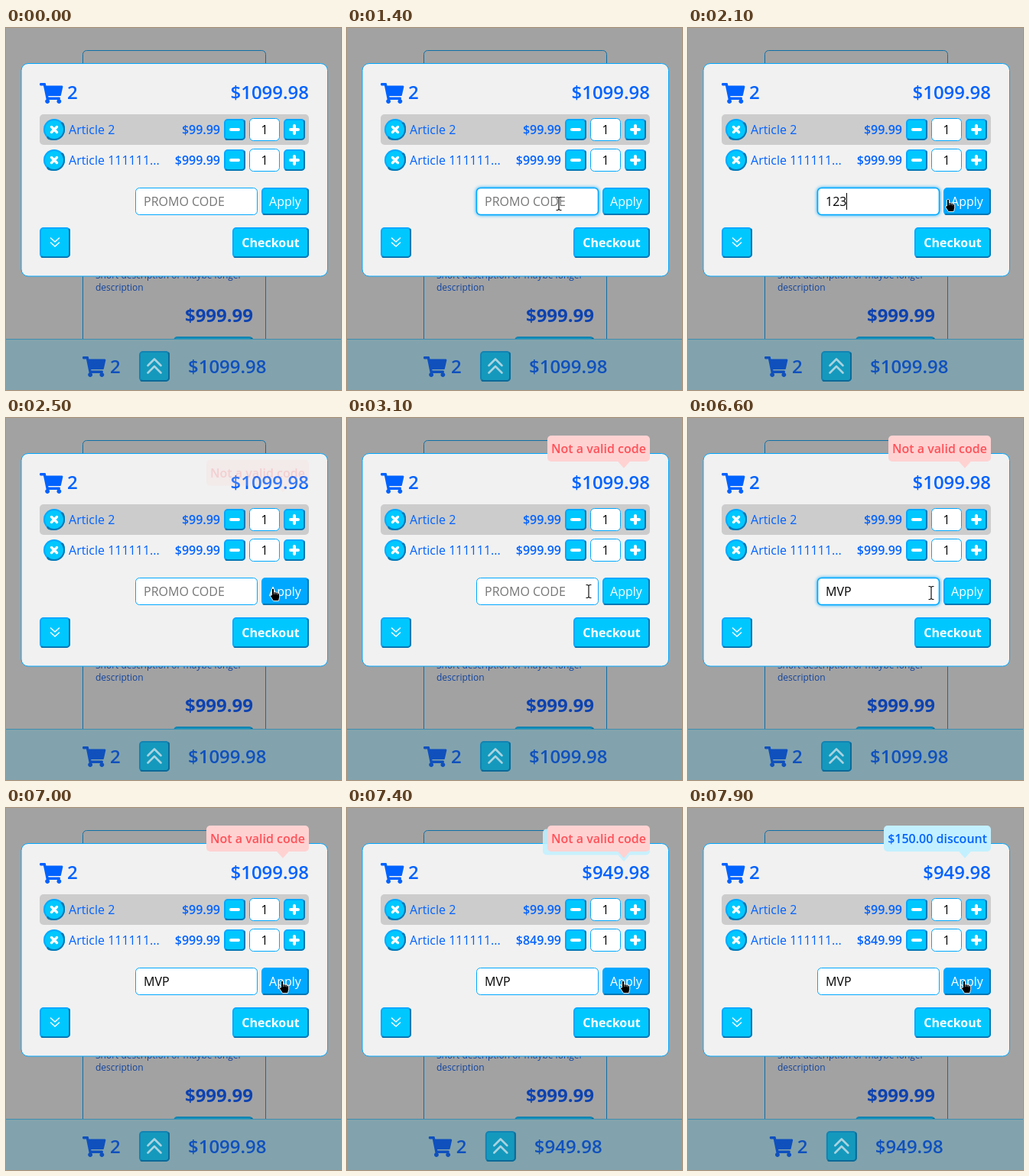
Recreate the animation shown at these times as an HTML page. Size 438x474 px, loop 8 s.

```html
<!DOCTYPE html>
<html lang="en">
<head>
<meta charset="utf-8">
<title>Shopping cart</title>
<style>
html, body { margin: 0; width: 438px; height: 474px; overflow: hidden; background: #a2a2a2; }
svg { display: block; font: 16px "Open Sans", "Noto Sans", sans-serif; }
text { white-space: pre; }
.focus { filter: drop-shadow(0 0 2px #00aaff); stroke-width: 1.6; }
</style>
</head>
<body>
<svg id="stage" width="438" height="474" viewBox="0 0 438 474">
  <defs>
    <path id="cart" transform="scale(.0528)" d="M528 301l47-208C579 78 567 64 552 64H159l-9-45C148 8 138 0 127 0H24C11 0 0 11 0 24v16c0 13 11 24 24 24h70l70 343c-17 10-28 28-28 49c0 31 25 56 56 56s56-25 56-56c0-16-6-30-17-40h210c-11 10-17 24-17 40c0 31 25 56 56 56s56-25 56-56c0-22-13-41-32-50l6-25c3-15-8-29-23-29H218l-6-32h293c11 0 21-8 23-19z"/>
    <path id="arrow" d="M.5 .5V16.5L4.3 13L7 19.2L9.8 18L7.2 12H12.3z" fill="#000" stroke="#fff"/>
    <g id="ibeam" fill="none">
      <path d="M-3.5 -8.5H-1.5L0 -7.5L1.5 -8.5H3.5M0 -7.5V7.5M-3.5 8.5H-1.5L0 7.5L1.5 8.5H3.5" stroke="#fff" stroke-opacity=".6" stroke-width="2.6"/>
      <path d="M-3.5 -8.5H-1.5L0 -7.5L1.5 -8.5H3.5M0 -7.5V7.5M-3.5 8.5H-1.5L0 7.5L1.5 8.5H3.5" stroke="#111" stroke-width="1.2"/>
    </g>
    <g id="hand">
      <path d="M2.5 2Q4 .2 5.5 2V6Q7 5 8 6.3Q9.4 5.5 10.3 7Q12.5 6.6 12.7 9V12.5L11.5 17.5H4.5L.7 11.5Q.4 9.4 2.5 10z" fill="#000" stroke="#fff" stroke-width=".9"/>
      <path d="M5.6 6V9M8 6.5V9M10.3 7V9.5" stroke="#fff" stroke-width=".6"/>
    </g>
  </defs>
</svg>
<script>
const stage = document.getElementById('stage');
const BLUE = '#0062ff', LINE = '#00a8ff', SHADE = '#0077b5', CYAN = '#00c8ff';

function add(tag, attrs, parent = stage) {
  const el = document.createElementNS('http://www.w3.org/2000/svg', tag);
  for (const k in attrs) el.setAttribute(k, attrs[k]);
  return parent.appendChild(el);
}
const group = parent => add('g', {}, parent);
const rect = (x, y, width, height, fill, rx, parent, more) =>
  add('rect', { x, y, width, height, fill, rx, ...more }, parent);
const stroke = (d, width, parent, color = '#fff') =>
  add('path', { d, fill: 'none', stroke: color, 'stroke-width': width, 'stroke-linecap': 'round', 'stroke-linejoin': 'round' }, parent);
function label(str, x, y, fill, parent, size = 16, weight = 400, anchor = 'start') {
  const el = add('text', { x, y, fill, 'font-size': size, 'font-weight': weight, 'text-anchor': anchor }, parent);
  el.textContent = str;
  return el;
}
// Raised button: light edge above and left, dark edge below and right
function button(x, y, w, h, parent, r = 5, [face, light, dark] = [CYAN, LINE, SHADE]) {
  rect(x, y, w, h, light, r, parent);
  const k = r * .3;
  add('path', { fill: dark, d: `M${x + w - k} ${y + k}Q${x + w} ${y + k} ${x + w} ${y + r}V${y + h - r}A${r} ${r} 0 0 1 ${x + w - r} ${y + h}H${x + r}Q${x + k} ${y + h} ${x + k} ${y + h - k}L${x + w / 2} ${y + h / 2}z` }, parent);
  return rect(x + 2, y + 2, w - 4, h - 4, face, Math.max(r - 2, 2), parent);
}
const field = (x, y, w, h, parent) =>
  rect(x + .5, y + .5, w - 1, h - 1, '#fff', 5, parent, { stroke: LINE });
const cart = (x, y, fill, parent) =>
  add('use', { href: '#cart', transform: `translate(${x} ${y})`, fill }, parent);

// Dimmed page
rect(0, 0, 438, 474, '#a2a2a2');
rect(100.5, 29.5, 239, 460, 'none', 5, stage, { stroke: '#0d70a8' });
label('Short description or maybe longer', 117, 328, '#12449f', stage, 12);
label('description', 117, 344, '#12449f', stage, 12);
label('$999.99', 323, 385, '#0d42b0', stage, 24, 700, 'end');
const dim = ['#1499bd', '#1283b2', '#0d6a98'];
button(219, 404, 104, 36, stage, 5, dim);

// Bottom bar
rect(0, 407, 438, 67, '#82a3ad');
rect(0, 407, 438, 1, '#3c8fb4');
const bar = group();
cart(100, 430, '#0f50bd', bar);
label('2', 136, 452, '#0f50bd', bar, 24, 600);
button(174, 423, 40, 40, bar, 5, dim);
stroke('M185.5 442L194 433.5L202.5 442M185.5 451.5L194 443L202.5 451.5', 2.6, bar, '#a9d3df');
const barTotal = label('', 238, 452, '#0f50bd', bar, 24, 600);

// Dialog
rect(20, 46.5, 400.5, 278.5, '#f1f1f1', 9, stage, { stroke: LINE });
cart(44, 72, BLUE);
label('2', 80, 93, BLUE, stage, 24, 600);
const total = label('', 396, 93, BLUE, stage, 24, 600, 'end');

function row(y, name) {
  button(49, y - 14, 28, 28, stage, 14);
  stroke(`M59.5 ${y - 3.5}l7 7m0 -7l-7 7`, 3.4);
  label(name, 82, y + 6, BLUE);
  button(285, y - 14, 28, 28);
  stroke(`M294 ${y}h10`, 4);
  field(318, y - 15, 40, 30);
  label('1', 338, y + 6, '#000', stage, 16, 400, 'middle');
  button(363, y - 14, 28, 28);
  stroke(`M372 ${y}h10m-5 -5v10`, 4);
  return label('', 280, y + 6, BLUE, stage, 16, 600, 'end');
}
rect(44, 113, 352, 40, '#cccccc', 5);
row(133, 'Article 2').textContent = '$99.99';
const price = row(173, 'Article 111111...');

const promo = field(169, 209, 160, 36);
const code = label('', 180, 233, '#000');
const caret = rect(180, 216, 1, 22, '#000');
const apply = button(334, 209, 62, 36);
label('Apply', 365, 233, '#fff', stage, 16, 400, 'middle');
button(44, 261, 40, 40);
stroke('M58.5 275l5.5 5l5.5 -5m-11 6l5.5 5l5.5 -5', 1.5);
button(296, 261, 100, 40);
label('Checkout', 346, 287, '#fff', stage, 16, 700, 'middle');

// Speech bubbles
function bubble(str, x, fill, color) {
  const g = group();
  rect(x, 23, 396 - x, 34, fill, 5, g);
  add('path', { d: 'M354 56.8h16l-8 9z', fill }, g);
  label(str, 391, 46, color, g, 16, 600, 'end');
  return g;
}
const discount = bubble('$150.00 discount', 256, '#c3f0ff', BLUE);
const error = bubble('Not a valid code', 262, '#ffd2d2', '#ff5158');
const pointer = add('use', {});

// Timelines: each entry holds until the next one
const moves = [
  [0], [100, 'arrow', 424, 444], [200, 'arrow', 372, 362], [300, 'arrow', 308, 284], [400, 'arrow', 275, 249],
  [600, 'ibeam', 277, 238], [700, 'ibeam', 277, 231], [1100, 'ibeam', 277, 230], [1500],
  [1900, 'ibeam', 284, 230], [2000, 'ibeam', 308, 229], [2100, 'hand', 336, 223], [2200, 'hand', 345, 222],
  [2900, 'ibeam', 326, 226], [3000, 'ibeam', 316, 227], [3300, 'ibeam', 309, 228], [5200],
  [6300, 'ibeam', 309, 228], [6600, 'ibeam', 318, 229], [6700, 'hand', 342, 227], [6800, 'hand', 357, 225]
];
const typed = [
  [0, ''], [1500, '1'], [1700, '12'], [1800, '123'], [2400, ''], [5200, 'M'], [5300, 'MV'], [5500, 'MVP']
];
const at = (list, t) => list.findLast(e => e[0] <= t);
const within = (t, ...spans) => spans.some(([a, b]) => t >= a && t < b);
const clamp = v => Math.min(1, Math.max(0, v));
const show = (el, on) => el.setAttribute('visibility', on ? 'visible' : 'hidden');

function rise(el, t, start, fade = 1) {
  const p = 1 - (1 - clamp((t - start) / 300)) ** 2;
  el.setAttribute('transform', `translate(0 ${40 * (1 - p)})`);
  el.setAttribute('opacity', p * fade);
}

function draw(t) {
  const paid = t >= 7200;
  total.textContent = barTotal.textContent = paid ? '$949.98' : '$1099.98';
  price.textContent = paid ? '$849.99' : '$999.99';
  bar.setAttribute('transform', `translate(${paid ? 6.8 : 0} 0)`);

  const text = at(typed, t)[1];
  code.textContent = text || 'PROMO CODE';
  code.setAttribute('fill', text ? '#000' : '#757575');
  promo.setAttribute('class', within(t, [900, 2400], [3600, 7000]) ? 'focus' : '');
  show(caret, within(t, [900, 1400], [1500, 2400], [3600, 4200], [4800, 6100], [6700, 7000]));
  caret.setAttribute('x', 180 + (text ? Math.round(code.getComputedTextLength()) : 0));

  const [, kind, x, y] = at(moves, t);
  show(pointer, kind);
  if (kind) {
    pointer.setAttribute('href', '#' + kind);
    pointer.setAttribute('transform', `translate(${x} ${y})`);
  }
  apply.setAttribute('fill', kind === 'hand' ? LINE : CYAN);

  rise(error, t, 2467, 1 - clamp((t - 7400) / 300));
  rise(discount, t, 7200);
}

// The picture advances ten times a second
function tick() {
  draw(Math.floor(performance.now() % 8000 / 100) * 100);
  requestAnimationFrame(tick);
}
tick();
</script>
</body>
</html>
```
